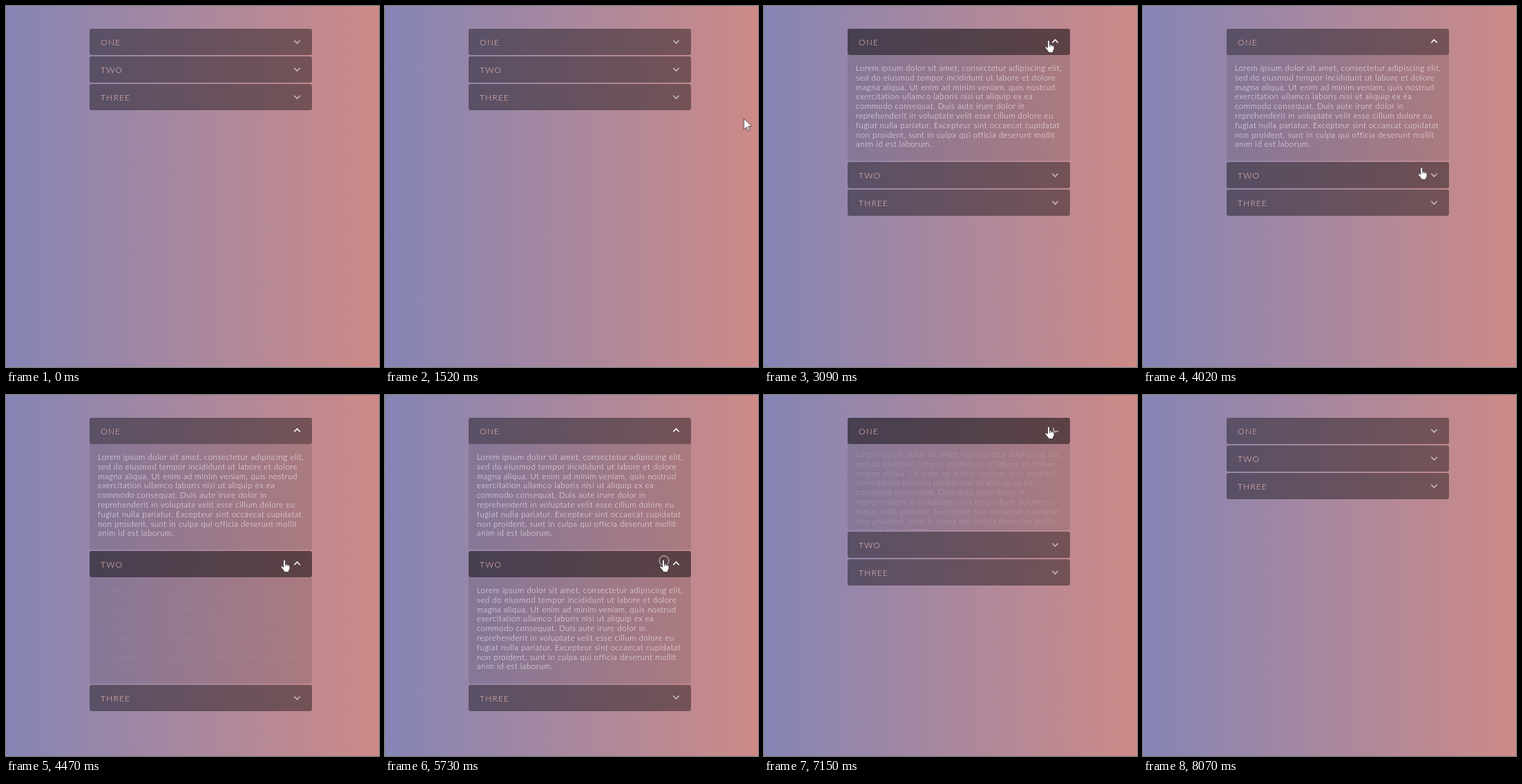
Write an HTML page that moves like this. It is 540x523 px and loops after 8.54 s.

```html
<!DOCTYPE html>
<html lang="en">
<head>
<meta charset="utf-8">
<title>Accordion</title>
<style>
  :root {
    --loop: 8540ms;
    --back: cubic-bezier(.68, -.55, .265, 1.55);
    --idle: rgba(0, 0, 0, .4);
    --hot: rgba(0, 0, 0, .52);
    --warm: rgba(0, 0, 0, .44);
    --open: 153.3px;
  }
  * { box-sizing: border-box; }
  html, body { margin: 0; width: 100%; height: 100%; overflow: hidden; }
  body {
    position: relative;
    background: linear-gradient(90deg, #8585b5, #cd8a87);
    font: 300 11.5px/13.8px Lato, "Open Sans", sans-serif;
  }

  .list { position: absolute; left: 121px; top: 33px; width: 322px; }
  .head {
    position: relative;
    height: 38px;
    padding-left: 16px;
    border-radius: 3px;
    background: var(--idle);
    color: #f2c0b8;
    font-size: 12px;
    line-height: 40px;
    letter-spacing: 1.2px;
  }
  .panel { height: 0; margin-bottom: 2px; overflow: hidden; background: rgba(0, 0, 0, .11); border-radius: 0 0 2px 2px; }
  .panel p {
    margin: 0;
    padding: 12px;
    white-space: nowrap;
    letter-spacing: .5px;
    color: rgba(255, 255, 255, .88);
    opacity: 0;
  }
  .chev {
    position: absolute;
    left: 294px;
    top: 11.7px;
    width: 13px;
    height: 13px;
    fill: none;
    stroke: #fff;
    stroke-width: 1.6;
    opacity: .6;
  }

  .one .head { animation: hover1 var(--loop) linear infinite; }
  .two .head { animation: hover2 var(--loop) linear infinite; }
  .three .head { animation: hover3 var(--loop) linear infinite; }
  .one .panel { animation: grow1 var(--loop) var(--back) infinite; }
  .two .panel { animation: grow2 var(--loop) var(--back) infinite; }
  .one p { animation: fade1 var(--loop) ease infinite, slide1 var(--loop) var(--back) infinite; }
  .two p { animation: fade2 var(--loop) ease infinite, slide2 var(--loop) var(--back) infinite; }
  .one .chev { animation: turn1 var(--loop) var(--back) infinite; }
  .two .chev { animation: turn2 var(--loop) var(--back) infinite; }

  @keyframes grow1 {
    0%, 23.852%, 87.178%, 100% { height: 0; }
    29.707%, 81.323% { height: var(--open); }
  }
  @keyframes grow2 {
    0%, 48.642%, 73.361%, 100% { height: 0; }
    54.496%, 67.506% { height: var(--open); }
  }
  @keyframes slide1 {
    0%, 23.852%, 87.178%, 100% { transform: translateY(-24px); }
    29.707%, 81.323% { transform: none; }
  }
  @keyframes slide2 {
    0%, 48.642%, 73.361%, 100% { transform: translateY(-24px); }
    54.496%, 67.506% { transform: none; }
  }
  @keyframes fade1 {
    0%, 26.756%, 87.178%, 100% { opacity: 0; }
    34.368%, 81.323% { opacity: 1; }
  }
  @keyframes fade2 {
    0%, 51.569%, 73.361%, 100% { opacity: 0; }
    59.18%, 67.506% { opacity: 1; }
  }
  @keyframes turn1 {
    0%, 23.852%, 85.995%, 100% { transform: rotate(0deg); opacity: .6; }
    29.707% { transform: rotate(180deg); opacity: 1; }
    81.323% { transform: rotate(180deg); opacity: 1; animation-timing-function: ease; }
  }
  @keyframes turn2 {
    0%, 48.642%, 72.19%, 100% { transform: rotate(0deg); opacity: .6; }
    54.496% { transform: rotate(180deg); opacity: 1; }
    67.506% { transform: rotate(180deg); opacity: 1; animation-timing-function: ease; }
  }
  @keyframes hover1 {
    0%, 21.43%, 45.6%, 77.17%, 88.2%, 100% { background-color: var(--idle); }
    23.8%, 43.27%, 79.5%, 86% { background-color: var(--hot); }
  }
  @keyframes hover2 {
    0%, 46.66%, 76.8%, 86.3%, 88.8%, 100% { background-color: var(--idle); }
    49%, 74.47% { background-color: var(--hot); }
    87% { background-color: var(--warm); }
  }
  @keyframes hover3 {
    0%, 86.9%, 89.2%, 100% { background-color: var(--idle); }
    87.5% { background-color: var(--warm); }
  }

  .cursor {
    position: absolute;
    left: 0;
    top: 0;
    width: 1px;
    height: 1px;
    overflow: visible;
    fill: #fff;
    stroke: #2b2528;
    stroke-width: .8;
    stroke-linejoin: round;
    animation: move var(--loop) ease-in-out infinite;
  }
  .arrow, .hand, .beam, .ring { opacity: 0; animation: var(--loop) step-end infinite; }
  .arrow { animation-name: arrow; }
  .hand { animation-name: hand; }
  .beam { animation-name: beam; fill: none; }
  .ring { animation-name: ring; fill: none; stroke: #e6dcdc; stroke-width: 1; }

  @keyframes move {
    0%, 94.5%, 100% { transform: translate(541px, 195px); }
    16.862% { transform: translate(541px, 195px); animation-timing-function: linear; }
    19.906% { transform: translate(472px, 92px); animation-timing-function: ease-out; }
    22.248%, 41.92% { transform: translate(412px, 50px); }
    47.775%, 73.536% { transform: translate(403px, 239px); }
    78.454% { transform: translate(412px, 46px); }
    85.012% { transform: translate(412px, 46px); animation-timing-function: ease-in; }
    90.398% { transform: translate(486px, 395px); animation-timing-function: ease-out; }
    94.496% { transform: translate(505px, 524px); }
  }
  @keyframes arrow {
    0%, 87.3% { opacity: 1; }
    21.43%, 100% { opacity: 0; }
  }
  @keyframes hand {
    0%, 43.27%, 74.47%, 87.3%, 100% { opacity: 0; }
    21.43%, 46.66%, 77.17% { opacity: 1; }
  }
  @keyframes beam {
    0%, 46.66%, 77.17%, 100% { opacity: 0; }
    43.27%, 74.47% { opacity: 1; }
  }
  @keyframes ring {
    0%, 24.415%, 49.227%, 68.091%, 81.897%, 100% { opacity: 0; }
    23.419%, 48.232%, 67.08%, 80.902% { opacity: 1; }
  }
</style>
</head>
<body>
  <div class="list">
    <section class="one"></section>
    <section class="two"></section>
    <section class="three"></section>
  </div>

  <svg class="cursor">
    <circle class="ring" cx="1" cy="1" r="7"/>
    <path class="arrow" d="M0 0V16L3.8 12.5 6.3 18.3 8.7 17.3 6.2 11.6H11.3z"/>
    <path class="hand" d="M-1.5 10.5V1.2a1.5 1.5 0 0 1 3 0V6q1.3-.9 2.4.5 1.4-.7 2.2.6 1.7-.3 1.9 1.5V12.5L6.5 15.5V17.6H-.5V16L-4.8 10.8q-.6-1.6.6-2.1 1.2-.3 2.7 1.8zM1.5 6V9M3.9 6.5V9M6.1 7.1V9"/>
    <path class="beam" d="M-3-8H3M0-8V8M-3 8H3"/>
  </svg>

<script>
  const lines = [
    "Lorem ipsum dolor sit amet, consectetur adipiscing elit,",
    "sed do eiusmod tempor incididunt ut labore et dolore",
    "magna aliqua. Ut enim ad minim veniam, quis nostrud",
    "exercitation ullamco laboris nisi ut aliquip ex ea",
    "commodo consequat. Duis aute irure dolor in",
    "reprehenderit in voluptate velit esse cillum dolore eu",
    "fugiat nulla pariatur. Excepteur sint occaecat cupidatat",
    "non proident, sunt in culpa qui officia deserunt mollit",
    "anim id est laborum."
  ];
  for (const item of document.querySelectorAll("section")) {
    item.innerHTML = `
      <div class="head">${item.className.toUpperCase()}
        <svg class="chev" viewBox="0 0 13 13"><path d="M2.3 4.8 6.5 9 10.7 4.8"/></svg>
      </div>
      <div class="panel"><p>${lines.join("<br>")}</p></div>`;
  }
</script>
</body>
</html>
```
